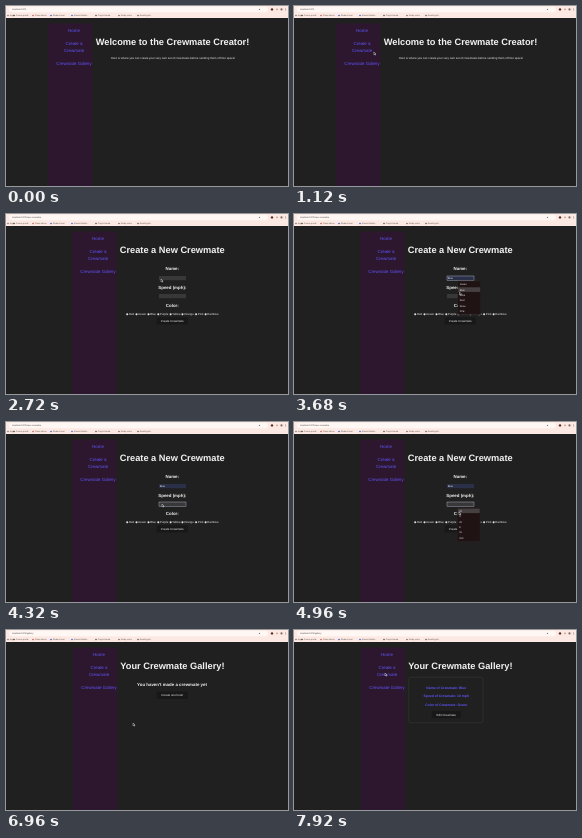
An HTML page for the animation above (8000 ms loop, 282 by 180 pixels).

```html
<!DOCTYPE html>
<html lang="en">
<head>
<meta charset="utf-8">
<title>Crewmate Creator</title>
<style>
  html, body { margin: 0; width: 100%; height: 100%; overflow: hidden; background: #202020; }
  svg { display: block; width: 100vw; height: 100vh; }
  text { font-family: "Liberation Sans", Arial, sans-serif; text-rendering: geometricPrecision; }
</style>
</head>
<body>
<svg id="stage" viewBox="0 0 282 180"></svg>
<script>
const LOOP = 8000, STEP = 80;
const LINK = '#5f55f8', WHITE = '#f2f2f2';
const stage = document.getElementById('stage');

function add(parent, tag, attrs, content) {
  const node = document.createElementNS('http://www.w3.org/2000/svg', tag);
  for (const key in attrs) node.setAttribute(key, attrs[key]);
  if (content) node.textContent = content;
  parent.append(node);
  return node;
}
const group = parent => add(parent, 'g', {});
const rect = (parent, x, y, width, height, fill, more) =>
  add(parent, 'rect', { x, y, width, height, fill, ...more });
const dot = (parent, cx, cy, r, fill, more) => add(parent, 'circle', { cx, cy, r, fill, ...more });
const text = (parent, content, x, y, size, fill = WHITE, more) =>
  add(parent, 'text', { x, y, 'font-size': size, fill, ...more }, content);
const centred = (parent, content, x, y, size, fill, more) =>
  text(parent, content, x, y, size, fill, { 'text-anchor': 'middle', ...more });
const bold = (parent, content, x, y, size, fill) =>
  centred(parent, content, x, y, size, fill, { 'font-weight': 700 });

function button(parent, label, x, y, width) {
  rect(parent, x - width / 2, y - 3.7, width, 7.4, '#181818', { rx: 1.4 });
  centred(parent, label, x, y + 1, 2.95);
}

function page(sidebarX, title, titleX) {
  const g = group(stage);
  rect(g, sidebarX, 17.5, 44.4, 163, '#2d172e');
  const links = [['Home', 26], ['Create a', 39.2], ['Crewmate', 45.8], ['Crewmate Gallery', 59.2]];
  for (const [label, y] of links) centred(g, label, sidebarX + 26, y, 4.45, LINK);
  bold(g, title, titleX, 39.2, 9.25);
  return g;
}

function field(parent, y, value) {
  const box = rect(parent, 153, y, 27, 4.2, '#3b3b3b', { 'stroke-width': 0.4 });
  const label = text(parent, value, 153.7, y + 3.1, 2.6);
  return (filled, focused) => {
    box.setAttribute('fill', filled ? '#293047' : '#383838');
    box.setAttribute('stroke', focused ? '#b9c4dc' : 'none');
    show(label, filled);
  };
}

function popup(parent, x, y, items, active) {
  const g = group(parent);
  rect(g, x, y, 23, 33.8, '#1f1314', { rx: 0.8, stroke: '#3a2c2d', 'stroke-width': 0.3 });
  items.forEach((item, i) => {
    const rowY = y + 3.2 + i * 5.4;
    if (i === active) rect(g, x + 0.5, rowY - 2.3, 22, 4.6, '#474041');
    text(g, item, x + 2, rowY + 1, 2.5);
  });
  return g;
}

const show = (node, on) => node.setAttribute('display', on ? 'inline' : 'none');

// Home
const home = page(42, 'Welcome to the Crewmate Creator!', 166.5);
centred(home, 'Here is where you can create your very own set of crewmates before sending them off into space!',
  167, 53.2, 2.88);

// Form
const form = page(66, 'Create a New Crewmate', 166.2);
bold(form, 'Name:', 166.3, 56, 4.4);
bold(form, 'Speed (mph):', 166.3, 74.5, 4.4);
bold(form, 'Color:', 166.3, 93.2, 4.4);
const nameField = field(form, 62, 'Blue');
const speedField = field(form, 80, '10');
const colors = [['Red', 5.3], ['Green', 8], ['Blue', 5.8], ['Purple', 8.35],
  ['Yellow', 7.8], ['Orange', 9.6], ['Pink', 5.6], ['Rainbow', 11.2]];
let radioX = 121.2, greenDot;
for (const [name, width] of colors) {
  dot(form, radioX, 100.3, 1, '#f0f0f0', { stroke: '#777', 'stroke-width': 0.25 });
  if (name === 'Green') greenDot = dot(form, radioX, 100.3, 0.7, '#3b78e7');
  text(form, name, radioX + 1.7, 101.3, 2.88);
  radioX += width + 4;
}
button(form, 'Create Crewmate', 166.2, 106.9, 31);
const namePopup = popup(form, 163.7, 67, ['Green', 'Blue', 'Lime', 'Red', 'Rose', 'Pink'], 1);
const speedPopup = popup(form, 163.2, 85.6, ['10', '5', '20', '8', '15', '100'], 0);

// Gallery
const gallery = page(67, 'Your Crewmate Gallery!', 166.4);
const emptyNote = group(gallery);
bold(emptyNote, "You haven't made a crewmate yet", 166, 56, 4.4);
button(emptyNote, 'Create one here!', 166.3, 65.3, 31);
const card = group(gallery);
rect(card, 114.7, 47.2, 74.2, 45.6, 'none', { rx: 2, stroke: '#3a3a3a', 'stroke-width': 0.5 });
bold(card, 'Name of Crewmate: Blue', 152.3, 58.7, 3.4, LINK);
bold(card, 'Speed of Crewmate: 10 mph', 152.3, 67.2, 3.4, LINK);
bold(card, 'Color of Crewmate: Green', 152.3, 75.7, 3.4, LINK);
button(card, 'Edit Crewmate', 152.2, 84.6, 29);

// Browser bars
rect(stage, 0, 0, 282, 12, '#fce9e3');
rect(stage, 3, 0.8, 259, 5.4, '#fff7f4', { rx: 2.7 });
const address = text(stage, '', 6.2, 4.3, 2.2, '#4a4341');
dot(stage, 253.5, 3.4, 0.7, '#8b7d79');
dot(stage, 266, 3.4, 1.2, '#5b2b2b');
dot(stage, 271, 3.4, 0.8, '#d98f63');
dot(stage, 275.5, 3.4, 1.1, '#806b65');
for (const y of [2.3, 3.4, 4.5]) dot(stage, 279.5, y, 0.3, '#333');
const bookmarks = [[2, '#777', 'Apps'], [8, '#4a4a4a', 'Course portal'], [27, '#cc5b4c', 'Class videos'],
  [45, '#3156c8', 'Student mail'], [66, '#3a66d8', 'Shared folders'], [90, '#5d5150', 'Project board'],
  [113, '#8a6a5c', 'Study notes'], [132, '#665c5a', 'Reading list']];
for (const [x, color, label] of bookmarks) {
  dot(stage, x, 9.5, 0.8, color);
  text(stage, label, x + 1.8, 10.3, 2.1, '#5a504d');
}

const cursor = add(stage, 'path', {
  d: 'M0 0V2.8L.7 2.2 1.2 3.2 1.7 3 1.2 2H2.1Z', fill: '#111', stroke: '#fff', 'stroke-width': 0.4
});

// Pointer stops: time, x, y
const path = [
  [400, 165, 169], [480, 178, 118], [640, 178, 118], [720, 178, 133], [1200, 72, 39], [1360, 66, 39.5],
  [2240, 66, 39.5], [2720, 155, 65], [3040, 155, 65], [3600, 165.5, 78], [3760, 165.5, 78],
  [4240, 156, 82], [4560, 156, 82], [4880, 165, 90], [5200, 165, 90], [6000, 129.6, 99.5],
  [6080, 129.6, 99.5], [6400, 158, 106], [6720, 158, 106], [6960, 127, 93], [7040, 127, 93],
  [7280, 5, 4], [7360, 5, 4], [7600, 84, 39], [7680, 84, 39], [7920, 91, 43]
];

function pointerAt(t) {
  const next = path.findIndex(stop => stop[0] > t);
  if (next < 0) return path[path.length - 1].slice(1);
  const [t0, x0, y0] = path[next - 1], [t1, x1, y1] = path[next];
  const k = (t - t0) / (t1 - t0), eased = k * k * (3 - 2 * k);
  return [x0 + (x1 - x0) * eased, y0 + (y1 - y0) * eased];
}

function render(t) {
  const onHome = t < 2080, onGallery = t >= 6800;
  show(home, onHome);
  show(form, !onHome && !onGallery);
  show(gallery, onGallery);
  address.textContent = 'localhost:5173' + (onHome ? '' : onGallery ? '/gallery' : '/new-crewmate');
  nameField(t >= 3200, t >= 2800 && t < 4320);
  speedField(t >= 5120, t >= 4320 && t < 6000);
  show(namePopup, t >= 2960 && t < 3840);
  show(speedPopup, t >= 4480 && t < 5120);
  show(greenDot, t >= 6080);
  show(emptyNote, t < 7440);
  show(card, t >= 7440);
  show(cursor, t >= 400);
  if (t >= 400) cursor.setAttribute('transform', `translate(${pointerAt(t)})`);
}

function tick() {
  render(Math.floor((performance.now() % LOOP) / STEP) * STEP);
  requestAnimationFrame(tick);
}
tick();
</script>
</body>
</html>
```
